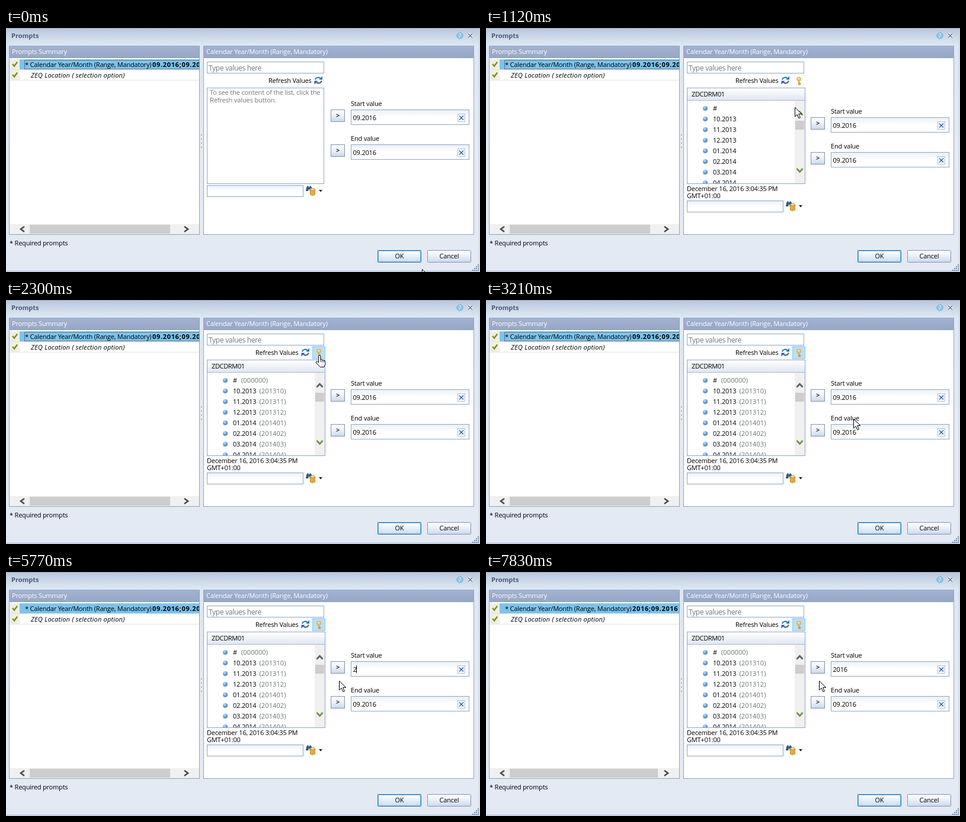
Recreate the animation shown at these times as an HTML page. Size 800 by 413 pixels, loop 8000 ms.

```html
<!DOCTYPE html>
<html lang="en">
<head>
<meta charset="utf-8">
<title>Prompts</title>
<style>
  html, body { margin: 0; width: 100%; height: 100%; overflow: hidden; background: #e3eaf4; }
  svg { display: block; width: 100%; height: 100%; }
  text { font: 11px "Open Sans", "Noto Sans", sans-serif; letter-spacing: -.2px; fill: #000; white-space: pre; }
  .white { fill: #fff; }
  .hint { fill: #757575; letter-spacing: -.13px; }
  .big { font-size: 12px; letter-spacing: -.3px; }
  .code { fill: #687272; letter-spacing: .1px; }
  .bold { font-weight: 700; letter-spacing: .68px; }
  .title { font-weight: 700; letter-spacing: 0; fill: #4b5a78; }
  .italic { font-style: italic; letter-spacing: .2px; }
  .tight { letter-spacing: -.35px; }
  .sign { font-weight: 600; }
</style>
</head>
<body>
<svg id="stage" viewBox="0 0 800 413" preserveAspectRatio="none"></svg>
<script>
const LOOP = 8000;
const BORDER = '#8fa5c8';

const box = (x, y, w, h, fill, stroke, extra = '') => stroke
  ? `<rect x="${x + .5}" y="${y + .5}" width="${w - 1}" height="${h - 1}" fill="${fill}" stroke="${stroke}" ${extra}/>`
  : `<rect x="${x}" y="${y}" width="${w}" height="${h}" fill="${fill}" ${extra}/>`;
const text = (x, y, str, cls = '', id = '') => `<text x="${x}" y="${y}" class="${cls}" id="${id}">${str}</text>`;
const line = (d, color, width = 1, extra = '') =>
  `<path d="${d}" fill="none" stroke="${color}" stroke-width="${width}" ${extra}/>`;
const group = (id, body, extra = '') => `<g id="${id}" ${extra}>${body}</g>`;
const gradient = (id, ...colors) => `<linearGradient id="${id}" x2="0" y2="1">${
  colors.map((c, i) => `<stop offset="${i / (colors.length - 1)}" stop-color="${c}"/>`).join('')}</linearGradient>`;

const panel = (x, w, label, lx) =>
  box(x, 30, w, 320, '#fff', BORDER) + box(x + 1, 31, w - 2, 20, 'url(#head)') + text(lx, 44, label, 'white');

const check = y => line(`M11 ${y}l3 3.5 5-7`, '#6f9420', 2.4);

const button = (x, label, lx, focus) =>
  box(x, 376, 74, 21, 'url(#btn)', focus ? '#2f6fae' : '#8295b4', 'rx="1"') +
  (focus ? box(x + 1, 377, 72, 19, 'none', '#6cc3ee') : '') + text(lx, 390, label);

const valueField = (name, y) =>
  text(582, y + .5, `${name} value`) +
  box(582, y + 7, 200, 26, 'url(#field)', BORDER) +
  box(762, y + 14, 13, 14, '#f4f9fd', '#a9c3dd') +
  line(`M765 ${y + 17.5}l7 7m0-7l-7 7`, '#2b5c94', 1.3) +
  box(548, y + 7, 24, 21, 'url(#btn)', '#7d92b8') +
  text(557, y + 21, '&gt;', 'sign');

const refresh = group('refresh',
  text(0, 93, 'Refresh Values') +
  line('M79 87.500a5 4.500 0 0 1 8.500-2.500', '#2878b8', 2) + '<path d="M85 87.500h6v-6z" fill="#2878b8"/>' +
  line('M89.500 89.500a5 4.500 0 0 1-8.500 2.500', '#2c5a94', 2) + '<path d="M83.500 89.500h-6v6z" fill="#2c5a94"/>');

const keyIcon =
  line('M528 89V96.500M529 93.500h2M529 95.500h2', '#d99a28', 1.8) +
  '<circle cx="528" cy="86.500" r="3.300" fill="#f6cd74" stroke="#d59a34"/><circle cx="528" cy="85" r="1" fill="#fff"/>';

const rows = ['#', ...Array.from({ length: 7 }, (_, i) => {
  const n = i + 9;
  return `${String(n % 12 + 1).padStart(2, '0')}.${2013 + Math.floor(n / 12)}`;
})];
const codeOf = s => s === '#' ? '000000' : s.slice(3) + s.slice(0, 2);

const list = group('list',
  box(339, 101, 200, 163, '#fff', BORDER) +
  box(340, 102, 198, 20, 'url(#listHead)') + line('M340 122.5h198', '#a8b8d0') +
  text(347, 116, 'ZDCDRM01', 'tight') +
  `<g clip-path="url(#listClip)">${rows.map((s, i) =>
    `<circle cx="370" cy="${136 + 18 * i}" r="4" fill="url(#ball)"/>` + text(383, 140 + 18 * i, s)).join('')}
    ${group('codes', rows.map((s, i) => text(i ? 427.5 : 397, 140 + 18 * i, `(${codeOf(s)})`, 'code')).join(''))}</g>` +
  box(521, 123, 17, 140, '#f0f0f0') + box(522, 157, 15, 15, '#cdcdcd') +
  line('M524.5 147.5l5-5.5 5 5.5', '#606060', 2.8, 'id="up"') + line('M524.5 238l5 5.5 5-5.5', '#73953a', 2.8) +
  text(339, 276, 'December 16, 2016 3:04:35 PM') + text(339, 288, 'GMT+01:00'));

const search = group('search',
  box(339, 266, 163, 20, 'url(#field)', BORDER) +
  '<path d="M506 276l1-6 1.500-2.500h2l.500 2h1l.500-2h2l1.500 2.500 1 6h-4.500v-3h-2v3z" fill="#285a90"/>' +
  '<path d="M513.500 273v9q4 3 8 0v-9z" fill="#e8ad3c" stroke="#b67a20" stroke-width=".8"/>' +
  '<ellipse cx="517.500" cy="273" rx="4" ry="1.800" fill="#fbe09a" stroke="#b67a20" stroke-width=".8"/>' +
  '<path d="M528 274h6l-3 3.500z" fill="#111"/>');

const dots = Array.from({ length: 4 }, (_, i) =>
  box(329, 180 + 7 * i, 2, 2, '#9cabc4') + box(331, 181 + 7 * i, 1, 2, '#fff')).join('');
const grip = Array.from({ length: 4 }, (_, i) => Array.from({ length: i + 1 }, (_, j) =>
  box(796 - 3 * j, 400 + 3 * i, 2, 2, '#8192ad')).join('')).join('');

const cursors =
  group('arrow', '<path d="M-.500.500V16l3.700-3.500 2.700 6.300 2.500-1-2.700-6.300h5z" fill="#fff" stroke="#000"/>') +
  group('hand', '<path d="M-1.500 1.500q0-2 1.700-2t1.700 2V7l1-.500q1.500 0 1.700 1.300l1-.300q1.500 0 1.700 1.300l.700-.200q1.800 0 1.800 1.800V15l-2 4.500h-6.500L-5 13q-1.500-2-.300-3 1.300-.700 3.800 2z" fill="#fff" stroke="#000"/>' +
    line('M1.900 7v4M4.600 8v3.500M7.300 9v3', '#000', .8)) +
  group('beam', line('M-3-7.500h2.500q.500 0 .500.500t.500-.500H3M0-7V7M-3 7.500h2.500q.500 0 .500-.500t.500.500H3', '#000'));

const stage = document.getElementById('stage');
stage.innerHTML = `<defs>
  ${gradient('titleBar', '#b7c5dc', '#cbd7e8', '#dce6f2')}
  ${gradient('body', '#dce6f2', '#e3eaf4', '#e3eaf4')}
  ${gradient('head', '#a3b2cf', '#95a6c7')}
  ${gradient('btn', '#fff', '#e9eff7', '#cbd8ea')}
  ${gradient('field', '#eaf0f7', '#fff', '#fff')}
  ${gradient('listHead', '#fff', '#dfe7f1')}
  <radialGradient id="ball" cx=".35" cy=".3"><stop stop-color="#c4e0f6"/><stop offset="1" stop-color="#5b96cc"/></radialGradient>
  <clipPath id="listClip"><rect x="340" y="123" width="181" height="140"/></clipPath>
  <clipPath id="rowClip"><rect x="23" y="50" width="303" height="22"/></clipPath>
  </defs>` +
  box(0, 0, 800, 413, 'url(#body)') + box(0, 0, 800, 28, 'url(#titleBar)') +
  line('M0 .5H799M0 411.500H799', '#9fb2cd') + line('M798.500 1V411', '#c3d0e2') +
  text(9, 17, 'Prompts', 'title') +
  '<circle cx="766" cy="13" r="5" fill="#8cc8ee" stroke="#5fa5d6"/>' + text(763.5, 17, '?', 'white') +
  line('M780 9.500l7 7m0-7l-7 7', '#fff', 3.4) + line('M780 9.500l7 7m0-7l-7 7', '#5c6b86', 1.5) +
  panel(5, 322, 'Prompts Summary', 10) +
  box(6, 53, 17, 36, '#efefe5') + box(23, 53, 303, 17, '#7dc3ec') +
  line('M6 70.500H326M6 88.500H326', '#e2e4e2') + check(61) + check(79) +
  line('M31 54.500H326M31 69.500H326M31.500 56V69', '#333', 1, 'id="focus" stroke-dasharray="1 1"') +
  `<g clip-path="url(#rowClip)">${text(32, 66, '* Calendar Year/Month (Range, Mandatory)')}${text(247, 66, '', 'bold', 'summary')}</g>` +
  text(42, 84, 'ZEQ Location ( selection option)', 'italic') +
  group('scroll', box(6, 332, 320, 17, '#f0f0f0') + box(40, 333, 237, 15, '#cdcdcd', '', 'id="thumb"') +
    line('M31 336l-6 4.500 6 4.500M301 336l6 4.500-6 4.500', '#505050', 2.8)) +
  dots +
  panel(333, 457, 'Calendar Year/Month (Range, Mandatory)', 338) +
  box(339, 57, 198, 20, '#fff', BORDER) + text(342, 72, 'Type values here', 'hint big') +
  box(438, 78, 100, 21, '#d9eefa', '#a5cfe8', 'id="hover"') + box(517, 78, 22, 22, '#b9e0f7', '#93c4e4', 'id="keyBack"') +
  refresh + group('key', keyIcon) +
  group('empty', box(339, 101, 198, 163, '#fff', BORDER) +
    text(344, 113, 'To see the content of the list, click the', 'hint') +
    text(344, 126, 'Refresh values button.', 'hint')) +
  list + search +
  group('values', valueField('Start', 131) + valueField('End', 190) +
    box(585, 145, 41, 13, '#3297fd', '', 'id="mark"') +
    text(585.5, 156, '', '', 'start') + text(585.5, 215, '09.2016') +
    line('M.500 145v13', '#000', 1, 'id="caret"')) +
  text(6, 368, '* Required prompts') +
  button(627, 'OK', 656.5, true) + button(711, 'Cancel', 731.5) + grip +
  group('cursor', cursors);

const el = Object.fromEntries([...stage.querySelectorAll('[id]')].map(n => [n.id, n]));
const show = (node, on) => node.setAttribute('display', on ? 'inline' : 'none');
const at = (steps, t) => steps.findLast(s => t >= s[0]);

// time, x, y, shape
const pointer = [
  [0, 703, 408, 'arrow'], [130, 690, 376, 'arrow'], [250, 648, 300, 'arrow'], [370, 594, 205, 'arrow'],
  [500, 549, 124, 'arrow'], [620, 527, 88, 'hand'], [1000, 525, 96, 'arrow'], [1120, 522, 134, 'arrow'],
  [1270, 543, 137, 'arrow'], [1400, 567, 136, 'arrow'], [1520, 570, 128, 'arrow'], [1650, 557, 113, 'arrow'],
  [1770, 541, 101, 'arrow'], [1900, 529, 94, 'hand'], [2300, 529, 94, 'hand'], [2550, 530, 93, 'hand'],
  [2670, 531, 93, 'hand'], [2940, 549, 128, 'arrow'], [3060, 583, 184, 'arrow'], [3210, 621, 201, 'arrow'],
  [3340, 641, 198, 'arrow'], [3460, 654, 187, 'arrow'], [3590, 658, 175, 'beam'], [3710, 656, 171, 'beam'],
  [4230, 615, 166, 'beam'], [4370, 583, 165, 'arrow'], [4500, 570, 165, 'arrow'], [4620, 565, 167, 'arrow'],
  [4760, 561, 172, 'arrow'], [4890, 561, 180, 'arrow'], [5010, 563, 184, 'arrow']
];
const typed = [[0, '09.2016'], [5770, '2'], [5900, '20'], [7060, '201'], [7190, '2016']];
const summary = [[0, '09.2016'], [5900, '2'], [6040, '20'], [7190, '201'], [7320, '2016']];

function draw(t) {
  const loaded = t >= 1000, keyed = t >= 2040, marked = t >= 3980 && t < 5770;
  const value = at(typed, t)[1], long = t >= 7320;

  show(el.empty, !loaded);
  show(el.list, loaded);
  show(el.key, loaded);
  show(el.codes, t >= 2170);
  show(el.hover, t >= 620 && !loaded);
  el.hover.setAttribute('fill', t >= 760 ? '#b9e0f7' : '#e4f2fb');
  show(el.keyBack, t >= 1900);
  el.keyBack.setAttribute('fill', keyed ? '#b9e0f7' : '#e4f2fb');
  el.up.setAttribute('stroke', t >= 1120 && t < 1270 ? '#73953a' : '#606060');
  el.refresh.setAttribute('transform', `translate(${loaded ? 421 : 443})`);
  el.search.setAttribute('transform', `translate(0 ${loaded ? 26 : 0})`);
  el.values.setAttribute('transform', `translate(0 ${loaded ? 13 : 0})`);

  show(el.focus, t < 3980);
  show(el.mark, marked);
  el.start.textContent = value;
  el.start.style.fill = marked ? '#fff' : '#000';
  el.summary.textContent = at(summary, t)[1] + ';09.2016';
  show(el.scroll, t < 5900 || long);
  el.thumb.setAttribute('width', long ? 250 : 237);
  show(el.caret, t >= 5770 && t < 6430 || t >= 6960 && t < 7830);
  el.caret.setAttribute('transform', `translate(${585 + 6 * value.length})`);

  const [, x, y, shape] = at(pointer, t);
  for (const name of ['arrow', 'hand', 'beam']) show(el[name], name === shape);
  el.cursor.setAttribute('transform', `translate(${x} ${y})`);
}

const begin = performance.now();
function tick() {
  draw((performance.now() - begin) % LOOP);
  requestAnimationFrame(tick);
}
tick();
</script>
</body>
</html>
```
